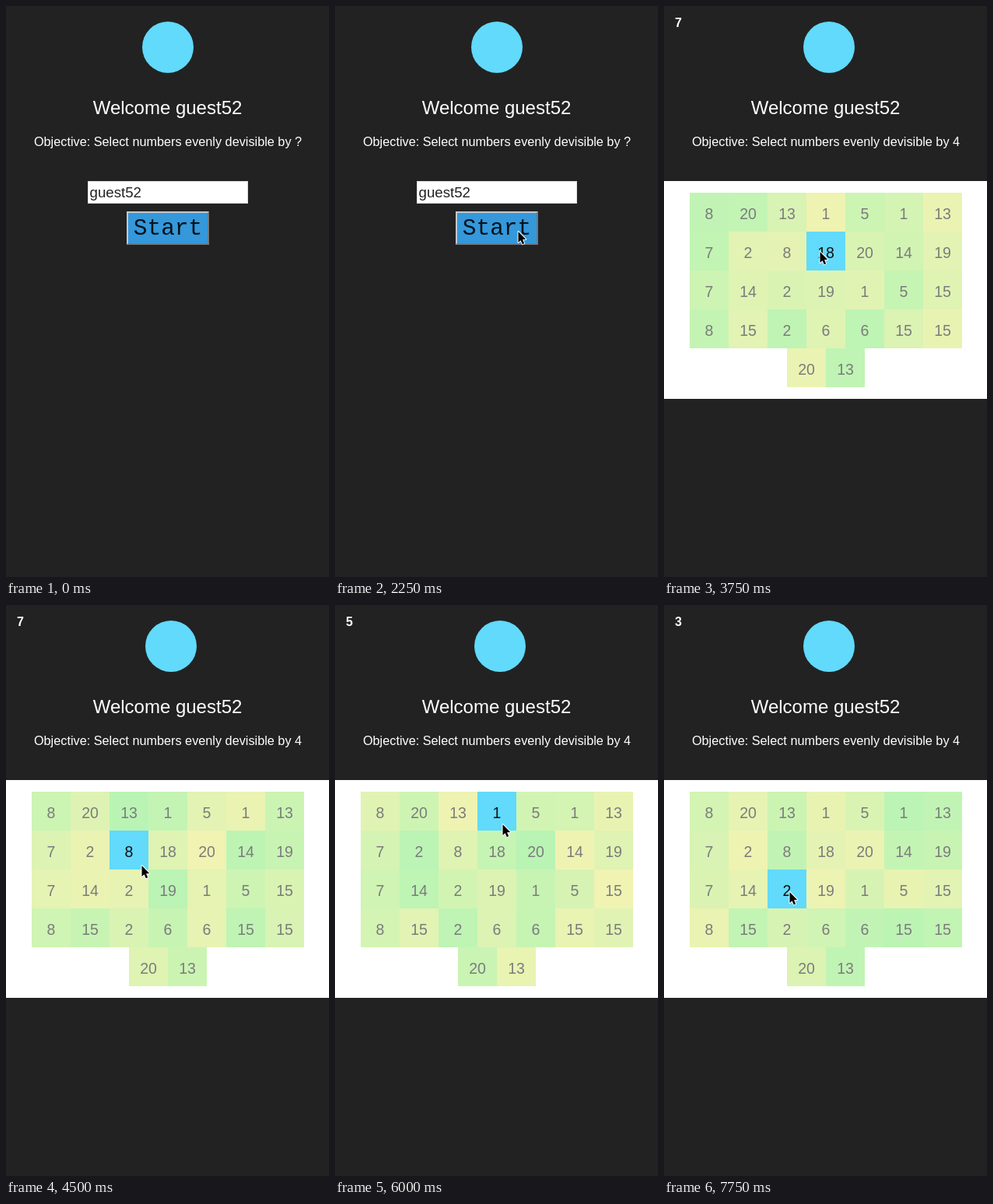
Recreate the animation shown at these times as an HTML page with a canvas. Size 415x734 px, loop 8 s.

```html
<!DOCTYPE html>
<html lang="en">
<head>
<meta charset="utf-8">
<title>Number game</title>
<style>
  html, body { margin: 0; width: 100%; height: 100%; overflow: hidden; background: #222; }
  canvas { display: block; }
</style>
</head>
<body>
<canvas id="stage" width="415" height="734"></canvas>
<script>
const ctx = document.getElementById('stage').getContext('2d');
const LOOP = 8000, STEP = 250, GAME_START = 2750;
const SANS = '"Liberation Sans", Arial, sans-serif';
const MONO = '"Liberation Mono", monospace';
const PLAYER = 'guest52';
const CELL = 50, CENTER = 208;
const YELLOW = [249, 243, 178], GREEN = [178, 244, 180];
const rows = [
  '8 20 13 1 5 1 13',
  '7 2 8 18 20 14 19',
  '7 14 2 19 1 5 15',
  '8 15 2 6 6 15 15',
  '20 13'
].map(row => row.split(' '));

const pointerPath = [
  { time: 750, x: 241, y: 288 },
  { time: 1250, x: 235, y: 290 },
  { time: 2750, x: 235, y: 290 },
  { time: 4500, x: 174, y: 335 },
  { time: 5500, x: 287, y: 265 },
  { time: 6750, x: 106, y: 307 },
  { time: 7750, x: 161, y: 369 }
];

const mix = (a, b, k) => a + (b - a) * k;

function random(seed) {
  const value = Math.sin(seed * 127.1 + 11.7) * 43758.5453;
  return value - Math.floor(value);
}

function pointerAt(time) {
  const next = pointerPath.findIndex(point => point.time > time);
  if (next <= 0) return pointerPath[next < 0 ? pointerPath.length - 1 : 0];
  const from = pointerPath[next - 1], to = pointerPath[next];
  const k = (time - from.time) / (to.time - from.time);
  return { x: Math.round(mix(from.x, to.x, k)), y: Math.round(mix(from.y, to.y, k)) };
}

function rect(x, y, w, h, color) {
  ctx.fillStyle = color;
  ctx.fillRect(x, y, w, h);
}

function text(value, x, y, font, { color = '#fff', align = 'center' } = {}) {
  ctx.font = font;
  ctx.textAlign = align;
  ctx.fillStyle = color;
  ctx.fillText(value, x, y);
}

function polygon(points, color) {
  ctx.beginPath();
  points.forEach(([x, y]) => ctx.lineTo(x, y));
  ctx.closePath();
  ctx.fillStyle = color;
  ctx.fill();
}

function drawHeader(playing) {
  ctx.fillStyle = '#61dafb';
  ctx.beginPath();
  ctx.arc(playing ? 212 : 208, 53, 33, 0, Math.PI * 2);
  ctx.fill();
  text(`Welcome ${PLAYER}`, 207.5, 139, `24px ${SANS}`);
  const objective = `Objective: Select numbers evenly devisible by ${playing ? 4 : '?'}`;
  text(objective, CENTER, 180, `16.25px ${SANS}`);
}

function drawForm() {
  rect(105, 225, 206, 29, '#ddd');
  rect(106, 226, 204, 27, '#fff');
  text(PLAYER, 107.5, 246, `18.67px ${SANS}`, { color: '#222', align: 'left' });
  rect(155, 264, 106, 43, '#3498db');
  polygon([[155, 264], [261, 264], [259, 266], [157, 266], [157, 305], [155, 307]], '#c4c8cc');
  polygon([[261, 307], [155, 307], [157, 305], [259, 305], [259, 266], [261, 264]], '#72777c');
  text('Start', CENTER, 293.5, `29.5px ${MONO}`, { color: '#06121a' });
}

// Each tile fades back and forth at its own pace.
function tileColor(seed, time) {
  const period = mix(1800, 3600, random(seed));
  const phase = (time / period + random(seed + 50)) % 1;
  const level = mix(0.1, 0.9, Math.abs(phase * 2 - 1));
  return `rgb(${YELLOW.map((channel, i) => Math.round(mix(channel, GREEN[i], level)))})`;
}

function drawGrid(time, pointer) {
  rect(0, 225, 415, 280, '#fff');
  rows.forEach((row, r) => row.forEach((number, c) => {
    const x = CENTER + (c - row.length / 2) * CELL;
    const y = 240 + r * CELL;
    const dx = pointer.x - x, dy = pointer.y - 1 - y;
    const hovered = dx >= 0 && dx < CELL && dy >= 0 && dy < CELL;
    rect(x, y, CELL, CELL, hovered ? '#61dafb' : tileColor(r * 7 + c, time));
    text(number, x + CELL / 2, y + 33.5, `19.5px ${SANS}`, { color: hovered ? '#111' : '#7c7c7c' });
  }));
}

function drawPointer({ x, y }) {
  ctx.save();
  ctx.translate(x, y);
  ctx.lineJoin = 'round';
  ctx.lineWidth = 2;
  ctx.strokeStyle = '#fff';
  const arrow = [[0.5, 0], [0.5, 14], [3.6, 11.2], [5.8, 16.2], [8.2, 15.2], [6, 10.3], [10.2, 10]];
  polygon(arrow, '#000');
  ctx.stroke();
  polygon(arrow, '#000');
  ctx.restore();
}

function draw(time) {
  const playing = time >= GAME_START;
  const pointer = pointerAt(time);
  rect(0, 0, 415, 734, '#222');
  drawHeader(playing);
  if (playing) {
    const seconds = 8 - Math.floor((time - GAME_START) / 1000);
    text(seconds, 14, 27, `bold 16px ${SANS}`, { align: 'left' });
    drawGrid(time, pointer);
  } else {
    drawForm();
  }
  if (time >= pointerPath[0].time) drawPointer(pointer);
}

const start = performance.now();

function tick() {
  const time = (performance.now() - start) % LOOP;
  draw(Math.floor(time / STEP) * STEP);
  requestAnimationFrame(tick);
}

tick();
</script>
</body>
</html>
```
